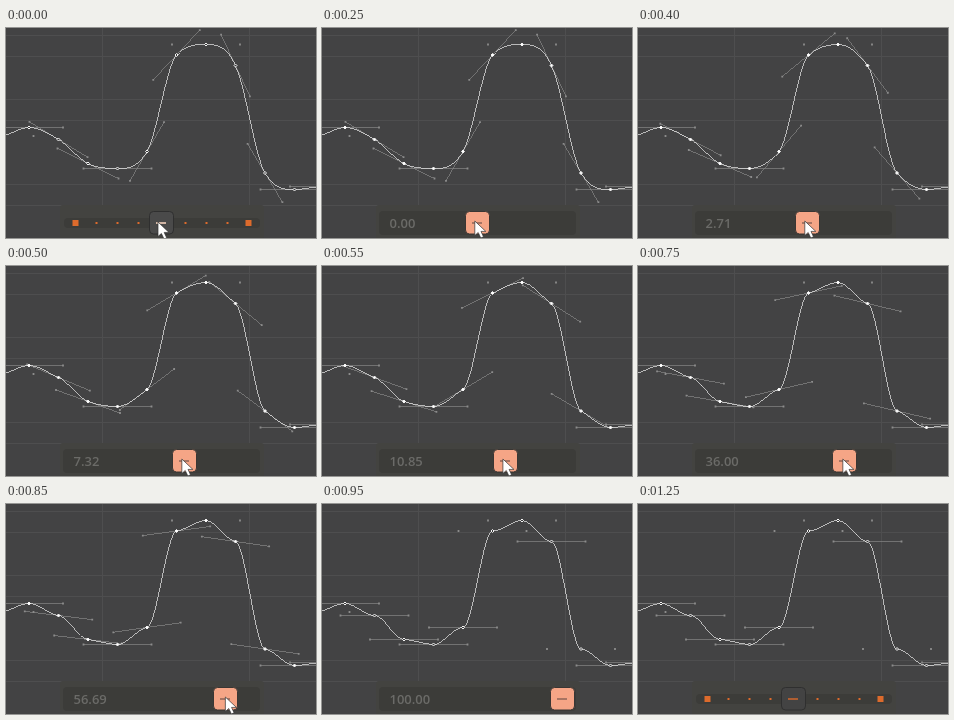
Animation, 310 px wide and 210 px high, one loop 1600 ms. Source, as an HTML page:

```html
<!DOCTYPE html>
<html lang="en">
<head>
<meta charset="utf-8">
<title>Tangent slider</title>
<style>
html, body { margin: 0; width: 100%; height: 100%; overflow: hidden; background: #434344; }
svg { display: block; }
text { font: 600 13px "Open Sans", "Noto Sans", sans-serif; fill: #6b6b68; }
.thin { fill: none; shape-rendering: crispEdges; }
</style>
</head>
<body>
<svg width="310" height="210" viewBox="0 0 310 210">
  <path id="grid" class="thin" stroke="#4e4e4f"/>
  <path id="tangents" class="thin" stroke="#868686" stroke-width=".7"/>
  <path id="ends" fill="#8c8c8c"/>
  <path id="curve" class="thin" stroke="#e0e0e0" stroke-width=".75"/>
  <path id="keys" stroke="#f4f4f4"/>
  <rect x="54" y="177" width="204" height="34" rx="3" fill="#434340"/>
  <g id="idle">
    <rect x="58" y="190" width="196" height="10" rx="4" fill="#3c3c39"/>
    <path id="dots" fill="#dd6b2c"/>
  </g>
  <g id="active">
    <rect x="57" y="183" width="197" height="24" rx="4" fill="#3c3c39"/>
    <text id="value" x="67.5" y="200"></text>
  </g>
  <g id="handle">
    <rect id="knob" x="-11.5" y="183.5" width="24" height="22.5" rx="4"/>
    <path id="dash" d="M-5 195H5"/>
  </g>
  <path id="cursor" d="M0 0V14.5L3.4 11.5L6 17L8.7 15.8L6.2 10.4H11Z" fill="#fff" stroke="#333" stroke-width=".7"/>
</svg>
<script>
const LOOP = 1600, STEP = 50, PRESS = 250, DONE = 950, RELEASE = 1250;
const SPACING = 29.5, REACH = 34, TRAVEL = 85, CENTRE = 155;
const heights = [108, 99.5, 111.5, 135.5, 140.5, 123.5, 27, 16.5, 37.5, 145, 161.5, 158.5];
const bareWhenFlat = new Set([0, 6, 7, 9]);
const drag = [[250, 0], [400, 14], [550, 28], [650, 37], [850, 64], [950, 85]];

const $ = id => document.getElementById(id);
const set = (id, attrs) => {
  for (const name in attrs) $(id).setAttribute(name, attrs[name]);
};
const show = (id, on) => set(id, { visibility: on ? "visible" : "hidden" });
const square = (x, y, r) => `M${x - r} ${y - r}h${2 * r}v${2 * r}h${-2 * r}z`;
const diamond = (x, y, r) => `M${x - r} ${y}L${x} ${y - r}L${x + r} ${y}L${x} ${y + r}Z`;

const keys = heights.map((y, i) => {
  const before = y - heights[i - 1], after = heights[i + 1] - y;
  // Central slope, limited so the curve never overshoots a neighbour
  const slope = before * after > 0
    ? Math.sign(after) * Math.min(Math.abs(before + after) / 2, 3 * Math.abs(before), 3 * Math.abs(after)) / SPACING
    : 0;
  return { x: -6.5 + i * SPACING, y, slope };
});

set("grid", {
  d: [7.5, 28.5, 71.5, 92.5, 156.5, 177.5].map(y => `M0 ${y}H310`).join("") +
     [96.5, 243.5].map(x => `M${x} 0V210`).join("")
});
set("dots", {
  d: [69.5, 242.5].map(x => square(x, 195, 3)).join("") +
     [90.5, 111.5, 132.5, 179.5, 200.5, 221.5].map(x => square(x, 195, 1)).join("")
});

function offsetAt(t) {
  if (t <= PRESS) return 0;
  if (t >= DONE) return TRAVEL;
  const i = drag.findIndex(([time]) => time >= t);
  const [t0, d0] = drag[i - 1], [t1, d1] = drag[i];
  return Math.round(d0 + (d1 - d0) * (t - t0) / (t1 - t0));
}

function flatten(slope, amount) {
  if (!slope || amount >= 1) return 0;
  const softening = 10.2 * amount / (1 - amount ** 4);
  return Math.sign(slope) / (1 / Math.abs(slope) + softening);
}

function drawGraph(amount, filled) {
  const third = SPACING / 3;
  let curve = "", lines = "", ends = "", marks = "";
  let last;
  keys.forEach(({ x, y, slope }, i) => {
    const s = flatten(slope, amount);
    const dx = REACH / Math.hypot(1, s), dy = dx * s;
    curve += last
      ? `C${last.x + third} ${last.y + last.s * third} ${x - third} ${y - s * third} ${x} ${y}`
      : `M${x} ${y}`;
    if (s || !bareWhenFlat.has(i)) lines += `M${x - dx} ${y - dy}L${x + dx} ${y + dy}`;
    ends += square(x - dx, y - dy, 0.9) + square(x + dx, y + dy, 0.9);
    marks += diamond(x, y, 1.5);
    last = { x, y, s };
  });
  set("curve", { d: curve });
  set("tangents", { d: lines });
  set("ends", { d: ends });
  set("keys", { d: marks, fill: filled ? "#fff" : "#3a3a3a" });
}

function render(time) {
  const t = Math.floor((time % LOOP) / STEP) * STEP;
  const pressed = t >= PRESS && t < RELEASE;
  const dragging = t >= PRESS && t < DONE;
  const hovered = t < PRESS;
  const offset = offsetAt(t);
  const amount = (offset / TRAVEL) ** 2;
  const knobX = CENTRE + (pressed ? offset : 0);

  drawGraph(amount, dragging);
  show("idle", !pressed);
  show("active", pressed);
  $("value").textContent = (amount * 100).toFixed(2);
  set("handle", { transform: `translate(${knobX} 0)` });
  set("knob", {
    fill: pressed ? "#f5a586" : hovered ? "#4a4a4a" : "#434343",
    stroke: pressed ? "#3a3633" : "#2f2f2f"
  });
  set("dash", {
    stroke: pressed ? "#a87462" : hovered ? "#d0b4a4" : "#dd6b2c",
    "stroke-width": pressed || hovered ? 2 : 1.4
  });
  show("cursor", t < DONE);
  const tip = t < STEP ? [CENTRE - 3, 194] : [knobX - 2.2 + 8 * amount ** 2, 193];
  set("cursor", { transform: `translate(${tip})` });
}

const start = performance.now();
function tick() {
  render(performance.now() - start);
  requestAnimationFrame(tick);
}
tick();
</script>
</body>
</html>
```
